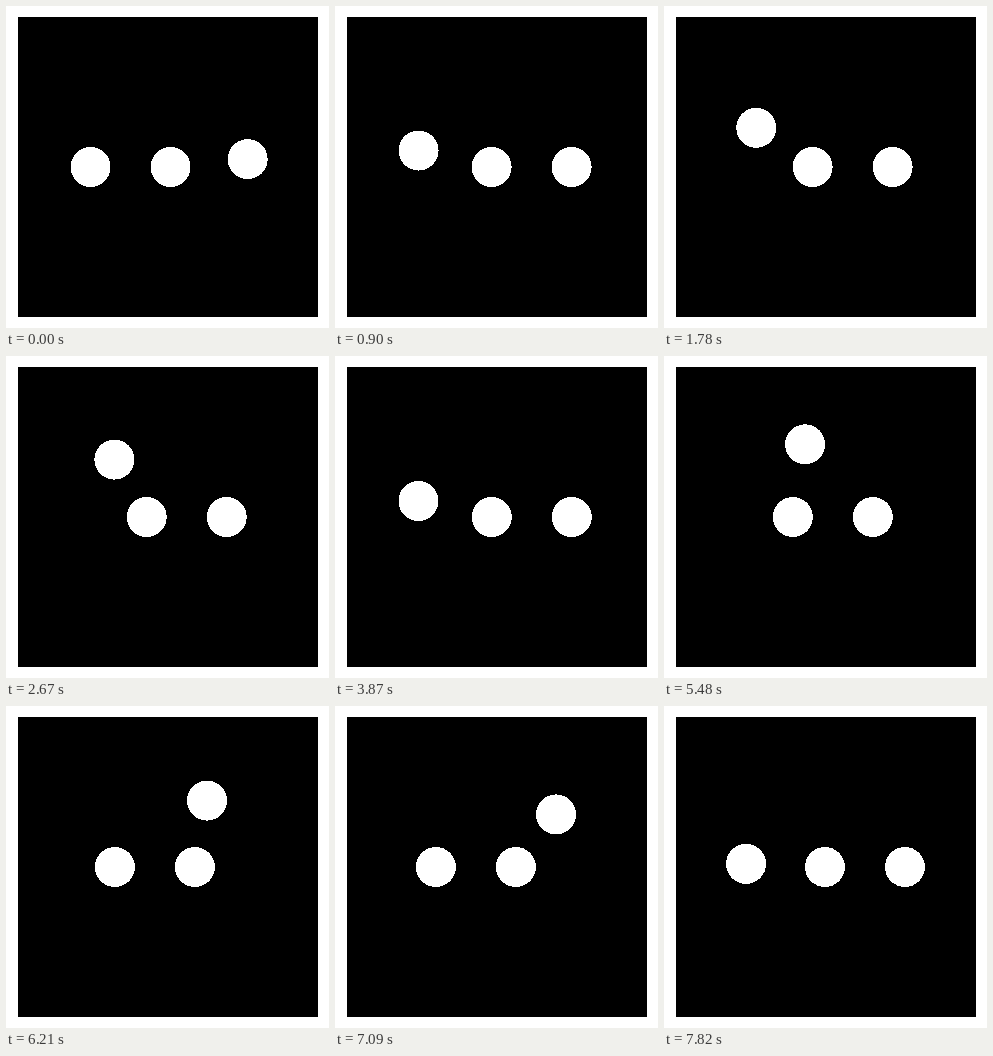
Recreate the animation shown at these times as an HTML page. Size 323 by 322 pixels, loop 7.92 s.

```html
<!DOCTYPE html>
<html lang="en">
<head>
<meta charset="utf-8">
<title>Juggling dots</title>
<style>
  html, body { margin: 0; width: 100%; height: 100%; overflow: hidden; background: #fff; }
  svg { display: block; }
</style>
</head>
<body>
<svg width="323" height="322" viewBox="0 0 323 322" fill="#fff" shape-rendering="crispEdges">
  <rect x="12" y="11" width="300" height="300" fill="#000"/>
  <path id="arc" d="M242 161C242 61 82 61 82 161" fill="none"/>
  <circle id="left" cy="161" r="20"/>
  <circle id="right" cy="161" r="20"/>
  <circle id="jumper" r="20"/>
</svg>
<script>
const LOOP = 7920;
const STEP = 147.5;           // ms each pose is held
const FIRST = 0.032;          // part of the jump done at the start
const JUMP_PER_STEP = 0.1501;

const [arc, left, right, jumper] =
  ["arc", "left", "right", "jumper"].map(id => document.getElementById(id));
const arcLength = arc.getTotalLength();

function draw(time) {
  const step = Math.floor(time % LOOP / STEP);
  const progress = (FIRST + step * JUMP_PER_STEP) % 1;
  // One dot leaps to the left end while the other two slide one place right.
  const { x, y } = arc.getPointAtLength(progress * arcLength);
  jumper.setAttribute("cx", x);
  jumper.setAttribute("cy", y);
  left.setAttribute("cx", 82 + 80 * progress);
  right.setAttribute("cx", 162 + 80 * progress);
}

const start = performance.now();
function tick() {
  draw(performance.now() - start);
  requestAnimationFrame(tick);
}
tick();
</script>
</body>
</html>
```
